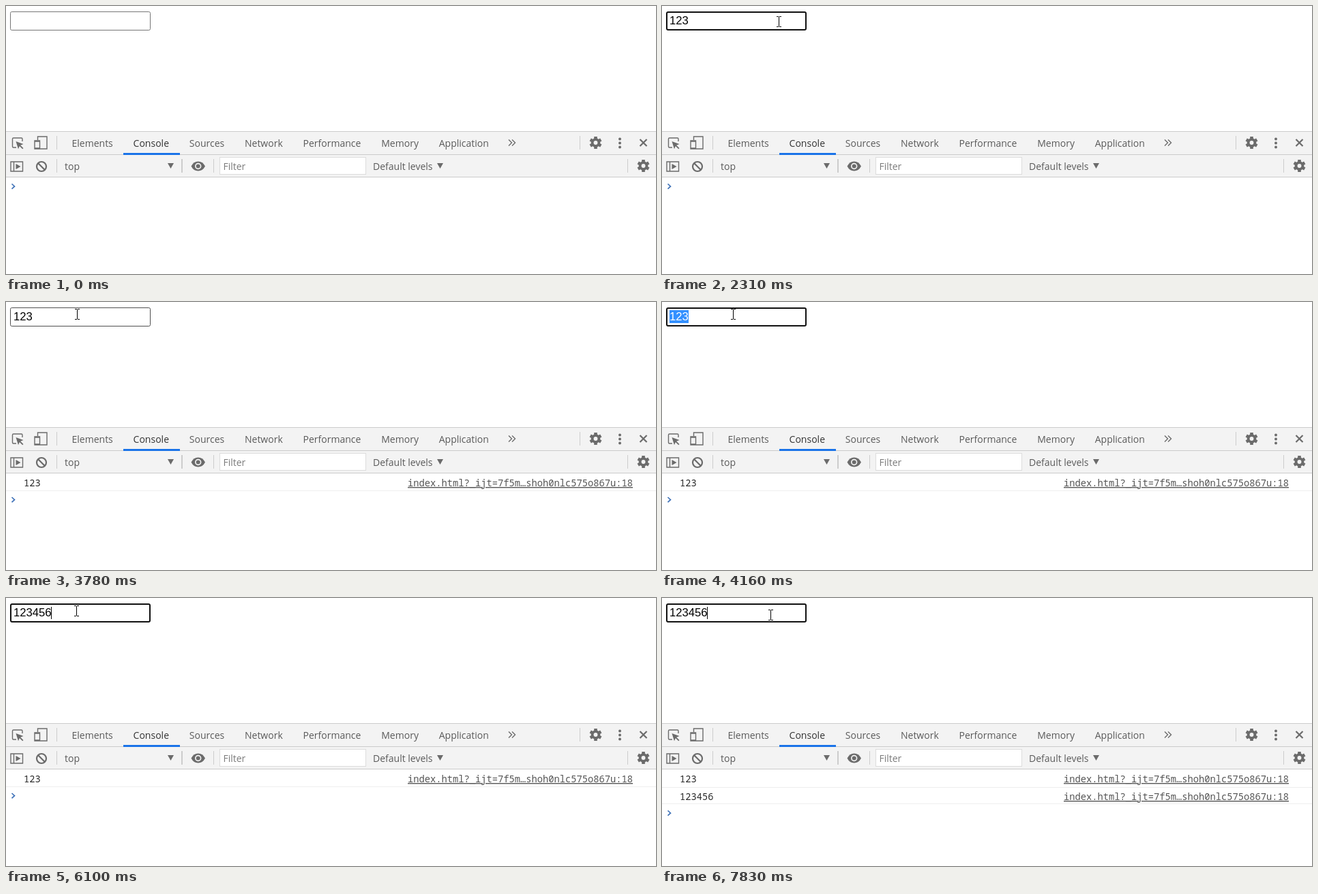
Recreate the animation shown at these times as an HTML page. Size 953x394 px, loop 8 s.

```html
<!DOCTYPE html>
<html lang="en">
<head>
<meta charset="utf-8">
<title>Input change event</title>
<style>
html, body { margin: 0; width: 100%; height: 100%; overflow: hidden; background: #fff; }
svg { display: block; }
.ui { font: 14px "Open Sans", "Noto Sans", sans-serif; fill: #5a5a5a; }
.ui .on { fill: #333; }
.ui.hint { fill: #7b7b7b; }
.mono { font: 13.75px "Noto Sans Mono", "DejaVu Sans Mono", monospace; fill: #2a2a2a; }
.mono .link { fill: #545454; text-decoration: underline; text-decoration-skip-ink: none; }
.field { font: 16.67px "Liberation Sans", Arial, sans-serif; }
.line { fill: none; stroke: #6b6b6b; stroke-width: 1.4; }
.bold { stroke-width: 2.2; }
.solid { fill: #6b6b6b; }
.sep { fill: none; stroke: #ccc; }
#spot { fill: #fffb82; mix-blend-mode: multiply; }
</style>
</head>
<body>
<svg width="953" height="394" viewBox="0 0 953 394">
  <defs>
    <g id="gear">
      <circle r="4.9" fill="none" stroke="#6b6b6b" stroke-width="3.9"/>
      <g id="teeth" stroke="#6b6b6b" stroke-width="4.6"></g>
    </g>
    <path id="drop" class="solid" d="M0 0h9l-4.5 8z"/>
  </defs>
  <rect width="953" height="394" fill="#fff"/>

  <rect id="box" fill="#fff" rx="2"/>
  <rect id="mark" x="11" y="12" width="28" height="19" fill="#3390ff"/>
  <text id="value" class="field" x="11" y="27"></text>
  <rect id="caret" y="13" width="1" height="18"/>

  <rect y="184" width="953" height="68" fill="#f3f3f3"/>
  <path d="M0 184.500H953M0 218.500H953M0 251.500H953" stroke="#cbcbcb"/>
  <path class="sep" d="M74.500 191v20M841.500 191v20M74.500 225v20M304.500 225v20M911.500 225v20"/>
  <path class="sep" d="M258 225v20" stroke-width="2"/>

  <path class="line" d="M15 208H11q-1.500 0-1.500-1.500V195.500q0-1.500 1.500-1.500H22.500q1.500 0 1.500 1.500V199"/>
  <path class="solid" d="M14.500 199l11 4-4.300 1.800 4.300 4.200-1.300 1.300-4.300-4.300-1.900 4.200z"/>
  <path class="line" d="M46.500 197V192H60V210H50M42 198h7.500v12H42zM42 199h7.500M42 209h7.500"/>
  <text id="tabs" class="ui" x="96.500" y="207"></text>
  <rect x="172" y="216" width="83" height="3" fill="#1a73e8"/>
  <path class="line" d="M737 196.500l4.500 4.500-4.500 4.500M742 196.500l4.500 4.500-4.500 4.500"/>
  <use href="#gear" x="864.500" y="201"/>
  <g id="dots" class="solid"></g>
  <path class="line bold" d="M929.500 196l10 10m0-10l-10 10"/>

  <path class="line" d="M7 229H24.500V243H7zM11.500 229v14"/>
  <path class="solid" d="M14.500 232l7 4-7 4z"/>
  <g class="line bold"><circle cx="52" cy="236" r="7"/><path d="M47 231l10 10"/></g>
  <text class="ui" x="86" y="241">top</text>
  <use href="#drop" x="237" y="231"/>
  <path class="solid" d="M271.500 235.500Q275 228.500 281.700 228.500T292 235.500Q288.500 242.500 281.700 242.500T271.500 235.500z"/>
  <circle cx="281.700" cy="235.500" r="3.900" fill="#6b6b6b" stroke="#f3f3f3" stroke-width="1.700"/>
  <rect x="313.500" y="222.500" width="214" height="25" fill="#fff" stroke="#dcdcdc"/>
  <text class="ui hint" x="318.500" y="241">Filter</text>
  <text class="ui" x="538" y="241">Default levels</text>
  <use href="#drop" x="632" y="231"/>
  <use href="#gear" x="934.500" y="235"/>

  <g id="log" class="mono"></g>
  <path id="prompt" d="M8.500 261.500l4 3.700-4 3.700" fill="none" stroke="#3f72b8" stroke-width="1.700"/>

  <g id="pointer">
    <path id="arrow" d="M.5.500V16.500L4.300 12.900 6.700 18.500 8.900 17.600 6.500 12H11.500z" fill="#fff" stroke="#111"/>
    <path id="beam" d="M-2-6.500H1M2-6.500H5M-2 8.500H1M2 8.500H5M1.500-6V8" fill="none" stroke="#000"/>
    <circle id="spot" r="15"/>
  </g>
</svg>
<script>
const LOOP = 8000, STEP = 72.5, HOLD = 70, BLINK = 515, DOUBLE = 300, DIGIT = 9.27;
const $ = id => document.getElementById(id);
const show = (el, on) => el.setAttribute("visibility", on ? "visible" : "hidden");
const set = (el, attrs) => { for (const k in attrs) el.setAttribute(k, attrs[k]); };
const inBox = s => s.x > 6 && s.x < 212 && s.y > 8 && s.y < 36;

// The session is a chain of states; each action appends the states it causes.
const states = [{ t: 0, value: "", logs: [], pressed: -LOOP, blink: 0 }];
const now = () => states[states.length - 1];
const at = (t, change) => states.push({ ...now(), ...change, t });

function move(t, steps, x, y, bow = 0) {
  const from = now();
  for (let k = 1; k <= steps; k++) {
    const p = k / steps, e = p * p * (3 - 2 * p);
    at(t + (k - 1) * STEP, {
      x: Math.round(from.x + (x - from.x) * e),
      y: Math.round(from.y + (y - from.y) * e - bow * 4 * e * (1 - e))
    });
  }
}

// A double click selects, a later click deselects on release, leaving the field logs its value.
function click(t) {
  const s = now(), focus = inBox(s), twice = t - s.pressed < DOUBLE;
  const logs = s.focus && !focus ? [...s.logs, s.value] : s.logs;
  at(t, { down: true, focus, logs, pressed: t, blink: t, selected: s.selected || twice });
  at(t + HOLD, { down: false, selected: twice, blink: s.selected ? t + HOLD : t });
}

function type(t, text) {
  [...text].forEach((c, i) => at(t + i * STEP, { value: now().value + c, blink: t + i * STEP }));
}

at(70, { x: 859, y: 338 });
move(70 + STEP, 7, 170, 22);
click(760);
type(1610, "123");
move(2770, 3, 252, 13);
click(3170);
move(3490, 5, 103, 17, 12);
click(3930);
click(4080);
move(4960, 1, 102, 18);
click(5110);
type(5950, "456");
move(6580, 4, 278, 49);
click(6960);
move(7440, 3, 158, 24);
click(7760);

$("teeth").innerHTML = [0, 1, 2, 3, 4, 5].map(i => `<path d="M0-5V-9" transform="rotate(${60 * i})"/>`).join("");
$("dots").innerHTML = [-1, 0, 1].map(i => `<circle cx="900" cy="${201.5 + 6 * i}" r="2"/>`).join("");
$("tabs").innerHTML = "Elements Console Sources Network Performance Memory Application".split(" ")
  .map((name, i) => `<tspan dx="${i ? 29.8 : 0}" class="${i === 1 ? "on" : ""}">${name}</tspan>`).join("");
$("log").innerHTML = now().logs.map((text, i) => `<g>
  <text x="26" y="${271 + 26 * i}">${text}</text>
  <text class="link" x="589" y="${271 + 26 * i}">index.html?_ijt=7f5m…shoh0nlc575o867u:18</text>
  <path stroke="#eee"/></g>`).join("");
const rows = [...$("log").children];

function draw(t) {
  const s = states.filter(s => s.t <= t).pop();
  const inside = inBox(s), count = s.value.length, shown = s.logs.length;

  const w = s.focus ? 2 : 1;
  set($("box"), {
    x: 6 + w / 2, y: 8 + w / 2, width: 206 - w, height: 28 - w, "stroke-width": w,
    stroke: s.focus ? "#101010" : inside ? "#4f4f4f" : "#767676"
  });
  $("value").textContent = s.value;
  set($("value"), { fill: s.selected ? "#fff" : "#000" });
  show($("mark"), s.selected);
  set($("caret"), { x: Math.floor(11 + count * DIGIT) });
  show($("caret"), s.focus && !s.selected && (t - s.blink) % (2 * BLINK) < BLINK);

  rows.forEach((row, i) => {
    show(row, i < shown);
    set(row.lastElementChild, { d: `M0 ${277.5 + 25 * i + (i < shown - 1)}H953` });
  });
  set($("prompt"), { transform: `translate(0 ${25.5 * shown})` });

  set($("pointer"), { transform: `translate(${s.x || 0} ${s.y || 0})` });
  show($("arrow"), s.x && !inside);
  show($("beam"), inside);
  show($("spot"), s.down);
}

function frame() {
  draw(performance.now() % LOOP);
  requestAnimationFrame(frame);
}
frame();
</script>
</body>
</html>
```
